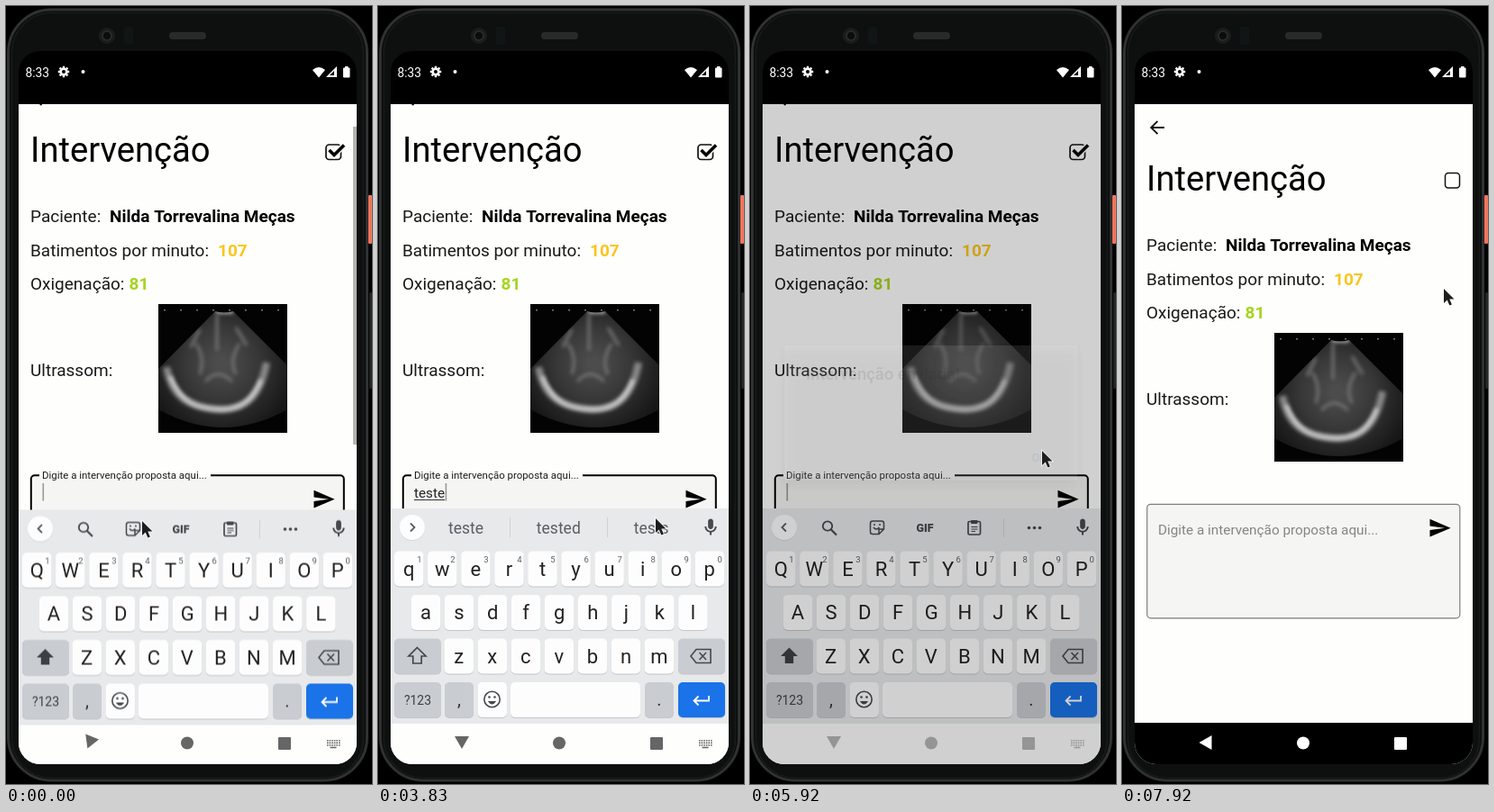
These frames come from a looping animation (406x864 px, 8000 ms). An HTML page with a canvas:

```html
<!DOCTYPE html>
<html lang="pt">
<head>
<meta charset="utf-8">
<title>Intervenção</title>
<style>
html, body { margin: 0; width: 100%; height: 100%; overflow: hidden; background: #000; }
canvas { display: block; }
</style>
</head>
<body>
<canvas id="stage" width="406" height="864"></canvas>
<script>
const W = 406, H = 864, LOOP = 8000, FPS = 12;
const stage = document.getElementById('stage').getContext('2d');
const makeLayer = (w, h) => Object.assign(document.createElement('canvas'), { width: w, height: h }).getContext('2d');
const keyboardLayer = makeLayer(W, H);
const scan = makeLayer(143, 143);
let c = stage;

// Timelines: [tick, value], each value holds until the next entry.
const typed = [[0, ''], [18, 't'], [23, 'te'], [26, 'tes'], [29, 'test'], [33, 'teste'], [57, '']];
const underlined = [[0, 0], [20, 1], [25, 2], [28, 3], [30, 4], [34, 5], [57, 0]];
const caretOn = [[0, 1], [5, 0], [11, 1], [39, 0], [45, 1], [51, 0], [57, 1], [78, 0]];
const caps = [[0, true], [18, false], [57, true]];
const toolbar = [[0, 'tools'], [20, 'empty'], [21, 't to there'], [25, 'te the test'],
  [28, 'tes test testing'], [30, 'test tests testing'], [34, 'teste tested tests'], [57, 'tools'], [82, 'empty']];
const slide = [[0, 1.5], [1, .5], [2, 0], [82, 45.5], [83, 110], [84, 190]];
const keyboardAlpha = [[0, 1], [82, .58], [83, .3], [84, .08], [85, 0]];
const backTurn = [[0, 22], [1, 8], [2, 0], [82, 48], [83, 72], [84, 90]];
const dimming = [[0, 0], [57, .25], [58, .47], [59, .58], [60, .6], [70, .38], [71, .18], [72, .07], [73, 0]];
const dialogAlpha = [[0, 0], [57, .4], [58, .85], [59, 1], [70, .5], [71, .1], [72, 0]];
const barAlpha = [[0, 1], [4, .66], [5, .33], [6, 0]];
const sendAlpha = [[0, 1], [54, .45], [55, 1]];
const labelDrop = [[0, 0], [83, .5], [84, .85], [85, 1]];
const pointer = [[0, [151, 572]], [42, [160, 575]], [43, [190, 582]], [44, [232, 582]], [45, [274, 577]],
  [46, [308, 569]], [47, [329, 563]], [48, [342, 556]], [49, [348, 550]], [50, [352, 545]], [51, [354, 542]],
  [63, [345, 522]], [64, [320, 498]], [65, [324, 494]], [76, [327, 490]], [77, [331, 487]], [78, [334, 485]],
  [79, [335, 484]], [88, [338, 482]], [94, [350, 372]], [95, [357, 314]]];

const at = (line, n) => line.findLast(([tick]) => tick <= n)[1];
const mix = (a, b, p) => a + (b - a) * p;
const gray = v => `rgb(${v},${v},${v})`;

function text(str, x, y, size, color, weight = 400, align = 'left') {
  c.font = `${weight} ${size}px Roboto, sans-serif`;
  c.textAlign = align;
  c.fillStyle = color;
  c.fillText(str, x, y);
}
function box(x, y, w, h, r, fill, stroke, lw = 1) {
  c.beginPath();
  c.roundRect(x, y, w, h, r);
  if (fill) { c.fillStyle = fill; c.fill(); }
  if (stroke) { c.strokeStyle = stroke; c.lineWidth = lw; c.stroke(); }
}
function disc(x, y, r, fill, stroke, lw = 1) {
  c.beginPath();
  c.arc(x, y, r, 0, 7);
  if (fill) { c.fillStyle = fill; c.fill(); }
  if (stroke) { c.strokeStyle = stroke; c.lineWidth = lw; c.stroke(); }
}
function path(d, x, y, { fill, stroke, lw = 1.8, scale = 1, turn = 0 }) {
  const p = new Path2D(d);
  c.save();
  c.translate(x, y);
  c.rotate(turn);
  c.scale(scale, scale);
  if (stroke) { c.strokeStyle = stroke; c.lineWidth = lw; c.stroke(p); }
  if (fill) { c.fillStyle = fill; c.fill(p); }
  c.restore();
}

function paintScan() {
  c = scan;
  box(0, 0, 143, 143, 0, '#030303');
  for (let i = 0; i < 8; i++) box(6 + i * 18, 6, 2, 1.5, 0, '#777');
  c.save();
  c.clip(new Path2D('M63 8Q73 11 83 8L143 68V117Q72 157 0 117V72Z'));
  const glow = c.createRadialGradient(70, 66, 6, 70, 66, 84);
  [[0, '#4c4c4c'], [.45, '#373737'], [.7, '#272727'], [1, '#161616']].forEach(s => glow.addColorStop(...s));
  box(0, 0, 143, 143, 0, glow);
  c.filter = 'blur(2px)';
  path('M9 70C14 99 30 115 69 117C96 117 113 103 120 65', 0, 0, { stroke: '#888', lw: 8 });
  path('M13 80C24 108 40 116 68 117C90 117 104 109 114 84', 0, 0, { stroke: '#ddd', lw: 3.5 });
  path('M65 12V52M42 44Q52 60 46 78M90 44Q78 62 86 78M52 86Q66 70 82 86M46 28L36 48M86 26L98 46', 0, 0, { stroke: '#777', lw: 3 });
  path('M64 8H83', 0, 0, { stroke: '#bbb', lw: 5 });
  c.restore();
}

function drawPhone() {
  box(0, 0, W, H, 0, '#000');
  box(2.5, 4, 398, 856, 48, '#0b0b0b', '#303232', 3);
  box(6.5, 7.5, 390, 850, 44, '#0e0f0f', '#171818', 2);
  box(402, 210, 4, 54, 1, '#f2755c');
  box(403, 318, 3, 107, 1, '#242626');
  box(181, 29, 41, 8, 4, '#292a2a');
  disc(112, 33, 9, '#1b1c1c');
  disc(112, 33, 5, '#0b0c0e', '#2d2e30', 1.5);
  box(131, 23, 10, 20, 3, '#101616');
}

function drawStatus() {
  text('8:33', 21.5, 78.5, 13.8, '#fff');
  disc(64, 73, 3.3, null, '#fff', 2.6);
  for (let i = 0; i < 8; i++) path('M0-4V-6.2', 64, 73, { stroke: '#fff', lw: 2.4, turn: i * Math.PI / 4 });
  disc(85.5, 73, 2, '#fff');
  path('M340 71Q347 65 354 71L347 79.5Z', 0, 0, { fill: '#fff' });
  path('M355 79H367V67Z', 0, 0, { fill: '#fff' });
  path('M359 77H364V72Z', 0, 0, { fill: '#000' });
  box(374, 68.5, 7.5, 11, 1, '#fff');
  box(376, 67, 3.5, 2, 0, '#fff');
}

function drawCheckbox(checked) {
  if (!checked) return box(358.5, 185.5, 16, 16.5, 3.5, null, '#111', 1.5);
  box(355, 186, 16.5, 16.5, 3.5, null, '#111', 1.7);
  path('M358.5 192L364 197.5L375 186.5', 0, 0, { stroke: '#fefefd', lw: 6.5 });
  path('M358.5 192L364 197.5L375 186.5', 0, 0, { stroke: '#000', lw: 3.6 });
}

function drawField(n, focused) {
  const p = at(labelDrop, n), str = at(typed, n);
  const label = 'Digite a intervenção proposta aqui...';
  box(27.8, 553.3, 347, 126.5, 4, '#f5f5f4', focused ? '#000' : '#7d7d7d', focused ? 2 : 1.2);
  if (p < 1) box(37, 551, mix(190, 0, p), 4, 0, focused ? '#fefefd' : '#f8f8f7');
  text(label, 40, mix(557, 587, p), mix(11.45, 15.3, p), focused ? '#1c1c1c' : '#858585');
  if (focused) {
    text(str, 40, 578, 15.3, '#222');
    const end = 40 + c.measureText(str).width;
    box(40, 580, c.measureText(str.slice(0, at(underlined, n))).width, 1, 0, '#333');
    if (at(caretOn, n)) box(end + .5, 562, 1.6, 19.5, 0, '#999');
  }
  c.globalAlpha = at(sendAlpha, n);
  path('M2 21L23 12 2 3V10L17 12 2 14Z', 339.3, 566.5, { fill: '#000', scale: 1.1 });
  c.globalAlpha = 1;
}

function drawPage(n) {
  const focused = n < 82;
  c.save();
  c.beginPath();
  c.rect(14, 109, 375, 733);
  c.clip();
  box(14, 109, 375, 733, 0, '#fefefd');
  c.translate(0, focused ? -32 : 0);
  path('M47 135H33M39.5 127.8L32.3 135L39.5 142.2', 0, 0, { stroke: '#111', lw: 1.9 });
  text('Intervenção', 27, 205, 38.2, '#000');
  drawCheckbox(n < 85);
  text('Paciente:', 27, 272, 19, '#1a1a1a');
  text('Nilda Torrevalina Meças', 115, 272, 19, '#000', 700);
  text('Batimentos por minuto:', 27, 309.5, 19, '#1a1a1a');
  text('107', 235, 309.5, 19, '#fac51c', 700);
  text('Oxigenação:', 27, 346.5, 19, '#1a1a1a');
  text('81', 136.5, 346.5, 19, '#a4d51d', 700);
  text('Ultrassom:', 27, 442.5, 19, '#1a1a1a');
  c.drawImage(scan.canvas, 169, 363);
  drawField(n, focused);
  c.restore();
  if (at(barAlpha, n)) {
    c.globalAlpha = at(barAlpha, n);
    box(385, 134, 4, 353, 0, '#b3b3b2');
    c.globalAlpha = 1;
  }
}

const INK = '#45494d', WHITE = '#fdfdfd', SPECIAL = '#c9ccd1';

function key(cx, cy, w, fill = WHITE) {
  box(cx - w / 2, cy - 18.5, w, 39, 5, '#c3c6ca');
  box(cx - w / 2, cy - 19.5, w, 39, 5, fill);
}

function drawTools() {
  disc(86, 577.5, 5.2, null, INK, 1.8);
  path('M90 581.5L96 587.5', 0, 0, { stroke: INK, lw: 2.2 });
  path('M136 572H146Q148.5 572 148.5 574.5V581L143 586.5H136Q133.5 586.5 133.5 584V574.5Q133.5 572 136 572ZM148.5 581H143V586.5M137 579Q140 583 143.5 579', 0, 0, { stroke: INK, lw: 1.5 });
  disc(138, 576, 1, INK);
  disc(144, 576, 1, INK);
  text('GIF', 194, 584, 12.5, INK, 900, 'center');
  box(242, 572.5, 13.5, 14.5, 1.5, null, INK, 1.7);
  box(245, 571, 7.5, 4, 1, INK);
  path('M245.5 578.5H252.5M245.5 581H252.5M245.5 583.5H250', 0, 0, { stroke: INK, lw: 1.2 });
  box(281, 569, 1, 21, 0, '#cfd2d5');
  for (const x of [309.5, 315.5, 321.5]) disc(x, 579.5, 1.8, INK);
}

function drawToolbar(mode) {
  const tools = mode === 'tools';
  disc(38, 580, 14, '#d5d8da');
  disc(38, 579, 14, WHITE);
  path(tools ? 'M2-4.5L-2.5 0L2 4.5' : 'M-2-4.5L2.5 0L-2 4.5', 38, 579, { stroke: '#5a5e62', lw: 1.8 });
  path('M12 14c1.7 0 3-1.3 3-3V5c0-1.7-1.3-3-3-3S9 3.3 9 5v6c0 1.7 1.3 3 3 3zm5-3c0 2.8-2.2 5-5 5s-5-2.2-5-5H5c0 3.5 2.6 6.4 6 6.9V21h2v-3.1c3.4-.5 6-3.4 6-6.9z',
    357.6, 567.6, { fill: INK, scale: .95 });
  if (tools) return drawTools();
  if (mode === 'empty') return;
  mode.split(' ').forEach((word, i) => text(word, 97.5 + 102.8 * i, 585.5, 17.5, '#5a5e62', 400, 'center'));
  for (const x of [146, 254]) box(x, 568, 1, 22, 0, '#cfd2d5');
}

function drawKeys(upper) {
  const letters = [['qwertyuiop', 34.3, 625], ['asdfghjkl', 53, 673.5], ['zxcvbnm', 89.7, 722]];
  for (const [row, x0, y] of letters) [...row].forEach((ch, i) => {
    const x = x0 + 37.05 * i;
    key(x, y, 32.5);
    text(upper ? ch.toUpperCase() : ch, x, y + 7.5, 22, '#222', 400, 'center');
    if (y === 625) text((i + 1) % 10, x + 11.5, y - 7.5, 9.5, '#5a5e62', 400, 'center');
  });
  key(44, 722, 52, SPECIAL);
  key(359, 722, 52, SPECIAL);
  path('M0-9.5L9.5 0H4.7V8H-4.7V0H-9.5Z', 43.5, 722, upper ? { fill: '#3c4043' } : { stroke: INK, lw: 1.7 });
  path('M353 714.5H369V729.5H353L347 722ZM356.5 718L364 726M364 718L356.5 726', 0, 0, { stroke: INK, lw: 1.6 });
  key(44, 770.5, 52, SPECIAL);
  key(90, 770.5, 32, SPECIAL);
  key(126.7, 770.5, 32.5);
  key(219, 770.5, 144);
  key(312, 770.5, 32, SPECIAL);
  key(359, 770.5, 52, '#1a73e8');
  text('?123', 44, 775.5, 14, '#3c4043', 400, 'center');
  text(',', 90, 777, 20, '#333', 400, 'center');
  text('.', 312, 777, 20, '#333', 400, 'center');
  disc(126.5, 770, 8.7, null, INK, 1.6);
  disc(123.5, 767.5, 1.3, INK);
  disc(129.5, 767.5, 1.3, INK);
  path('M121.8 772Q126.5 779 131.2 772Z', 0, 0, { fill: INK });
  path('M367 766V771.5H351M355.5 766.5L350.5 771.5L355.5 776.5', 0, 0, { stroke: '#fff', lw: 1.8 });
}

function drawKeyboard(n) {
  const alpha = at(keyboardAlpha, n);
  if (!alpha) return;
  c = keyboardLayer;
  c.clearRect(0, 0, W, H);
  box(14, 558, 375, 284, 0, '#e7e9eb');
  box(14, 797, 375, 45, 0, '#fefefd');
  drawToolbar(at(toolbar, n));
  drawKeys(at(caps, n));
  c = stage;
  c.globalAlpha = alpha;
  c.drawImage(keyboardLayer.canvas, 0, at(slide, n));
  c.globalAlpha = 1;
}

function drawNav(n, dim) {
  const closed = n >= 82;
  const color = closed ? '#fff' : gray(mix(102, 255, Math.min(1, dim / .58)));
  path('M-8-7H8L0 7Z', closed ? 92.5 : 93, 818, { fill: color, turn: at(backTurn, n) * Math.PI / 180 });
  disc(201, 818.5, 7, color);
  box(302, 812, 14, 14, 1, color);
  if (closed) return;
  for (let i = 0; i < 6; i++) for (let j = 0; j < 3; j++) box(356 + i * 2.6, 815 + j * 2.6, 1.6, 1.6, 0, color);
  box(359.5, 822.8, 7, 1.4, 0, color);
}

function drawDialog(alpha) {
  if (!alpha) return;
  c.save();
  c.globalAlpha = alpha;
  c.shadowColor = 'rgba(0,0,0,.45)';
  c.shadowBlur = 12;
  c.shadowOffsetY = 5;
  box(38.5, 377, 325, 150, 2, '#fefefe');
  c.shadowColor = 'transparent';
  text('Intervenção enviada!', 62, 415, 18.4, '#212121', 500);
  text('OK', 312.5, 506, 13, '#2474bd', 500);
  c.restore();
}

function drawScreen(n) {
  const dim = at(dimming, n);
  c.save();
  c.beginPath();
  c.roundRect(14, 50, 375, 792, 24);
  c.clip();
  box(14, 50, 375, 792, 0, '#000');
  drawStatus();
  drawPage(n);
  if (n >= 82) box(14, 796, 375, 46, 0, '#000');
  drawKeyboard(n);
  if (dim) box(14, 109, 375, 733, 0, `rgba(0,0,0,${dim})`);
  drawNav(n, dim);
  drawDialog(at(dialogAlpha, n));
  c.restore();
}

function draw(ms) {
  const n = Math.floor((ms % LOOP + 4) * FPS / 1000) % (LOOP * FPS / 1000);
  c = stage;
  drawPhone();
  drawScreen(n);
  const [x, y] = at(pointer, n);
  path('M0 0V16L3.7 12.6 6.3 18.6 8.9 17.4 6.3 11.6H11.5Z', x, y, { fill: '#1e1e1e', stroke: '#fff', lw: 1.4 });
}

paintScan();
const start = performance.now();
(function frame() {
  draw(performance.now() - start);
  requestAnimationFrame(frame);
})();
</script>
</body>
</html>
```
